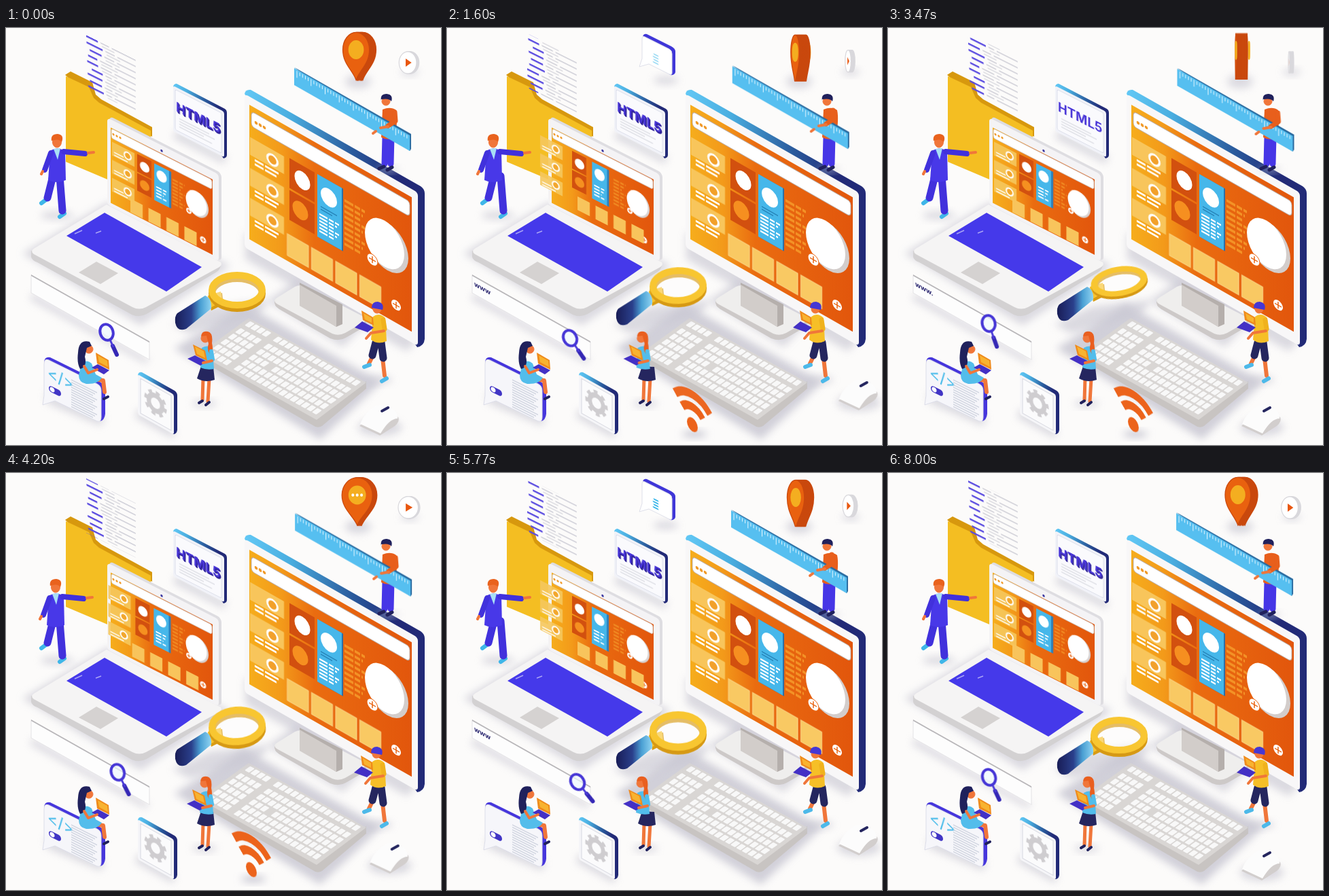
An HTML page that plays this animation: 640x614 px, repeating every 8030 ms.

```html
<!DOCTYPE html>
<html lang="en">
<head>
<meta charset="utf-8">
<title>Isometric web design</title>
<style>
html,body{margin:0;width:100%;height:100%;overflow:hidden;background:#fcfbfa}
svg{display:block;width:100vw;height:100vh}
text{font-family:Inter,Arial,sans-serif}
.limb{fill:none;stroke-linecap:round;stroke-linejoin:round}
.soft{fill:#c9c8d3;opacity:.65;filter:url(#blur)}
.white{fill:#fff}
.skin{fill:#f0763a;stroke:#f0763a}
.a4{animation:4015ms linear infinite}
.a8{animation:8030ms linear infinite}
.ruler{animation-name:ruler}
.mouse{animation-name:mouse}
.pull{animation-name:pull}
.nudge{animation-name:nudge}
.slip{animation-name:slip}
.drop{animation-name:drop}
.man{animation-name:man}
.woman{animation-name:woman}
.guy{animation-name:guy}
.bubble{animation-name:bubble}
.brace{animation-name:brace}
.para{animation-name:para}
.tag{animation-name:tag}
.rings{animation-name:rings}
.labels{animation-name:labels}
.reel{animation-name:reel}
.scroll{animation-name:scroll}
.bevel{animation-name:bevel}
.lens{animation-name:lens}
.lift{animation-name:lift}
.hoop{animation-name:hoop}
.dot{animation-name:dot}
.arc1{animation-name:arc1}
.arc2{animation-name:arc2}
.gear{animation:gear 8030ms linear infinite}
@keyframes ruler{0%,100%{transform:none}20%{transform:translate(5px,3px)}43.7%{transform:translate(-6px,-4px)}58%{transform:translate(-1.5px,-1px)}86.4%{transform:translate(1.5px,1px)}}
@keyframes mouse{0%,80%,100%{transform:none}17%{transform:translate(54px,-37px)}44%{transform:translate(56px,-37px)}58%{transform:translate(34px,-24px)}}
@keyframes pull{0%,78%,100%{transform:none}16%,45%{transform:translateX(-19px)}58%{transform:translateX(-18px)}}
@keyframes nudge{0%,78%,100%{transform:none}16%,58%{transform:translateX(-9px)}}
@keyframes slip{0%,78%,100%{transform:none}16%,58%{transform:translateX(-2px)}44%{transform:translateX(-5px)}}
@keyframes drop{0%,78%,100%{transform:none}16%,44%{transform:translate(9px,-8px)}58%{transform:translate(6px,-8px)}}
@keyframes man{0%,57%,100%{transform:none}16%,45%{transform:translateX(-7px)}}
@keyframes woman{0%,84%,100%{transform:none}19%,58%{transform:translateX(-4px)}44%{transform:translateX(-8px)}}
@keyframes guy{0%,84%,100%{transform:none}18%,60%{transform:translateX(-4px)}}
@keyframes bubble{0%,6%,84%,100%{opacity:0}11%,79%{opacity:1}}
@keyframes brace{0%,12%,38%,49%{opacity:0}15%,34%,53%,100%{opacity:1}}
@keyframes para{0%,38%{opacity:0}42%,100%{opacity:1}}
@keyframes tag{0%,8%,84%,100%{opacity:1}13%,79%{opacity:0}}
@keyframes rings{0%,46%,80%,100%{transform:none}54%,72%{transform:translateY(18px)}}
@keyframes labels{0%,46%,80%,100%{transform:none}54%,72%{transform:translateY(-27px)}}
@keyframes reel{0%,14%{transform:none}20%{transform:translateX(-4px)}38%,100%{transform:translateX(-35.5px)}}
@keyframes scroll{to{transform:translateY(-81px)}}
@keyframes bevel{0%,46%,100%{opacity:1}56%,88%{opacity:0}}
@keyframes lens{0%,100%{transform:translate(148px,448px)}10.3%{transform:translate(163px,453px) rotate(-8deg)}29%{transform:translate(198px,460px) rotate(-11deg)}43.2%{transform:translate(148px,435px) rotate(5deg)}59.4%{transform:translate(177px,445px) rotate(-8deg)}71.9%{transform:translate(192px,455px) rotate(-14deg)}}
@keyframes lift{0%,10.3%,100%{transform:none}29%,59.4%{transform:translateY(-13px)}71.9%{transform:translateY(-8px)}}
@keyframes hoop{0%,10.3%,100%{transform:translate(340px,386px)}29%{transform:translate(340px,386px) rotate(-4deg)}43.2%{transform:translate(340px,386px) rotate(-10deg) scaleY(.8)}59.4%{transform:translate(340px,385px) scaleY(1.25)}71.9%{transform:translate(340px,388px) scaleY(1.08)}}
@keyframes dot{0%,4%,66%,100%{opacity:0}6%,63%{opacity:1}}
@keyframes arc1{0%,7%,62.5%,100%{opacity:0}9%,60%{opacity:1}}
@keyframes arc2{0%,17%,58%,100%{opacity:0}20%,55%{opacity:1}}
@keyframes gear{to{transform:rotate(360deg)}}
</style>
</head>
<body>
<svg viewBox="0 0 640 614" preserveAspectRatio="none">
<defs>
<filter id="blur" x="-40%" y="-60%" width="180%" height="220%"><feGaussianBlur stdDeviation="6"/></filter>
<linearGradient id="edge"><stop stop-color="#62c8f5"/><stop offset=".25" stop-color="#4aaee0"/><stop offset=".6" stop-color="#2a5a9c"/><stop offset=".85" stop-color="#222a77"/></linearGradient>
<linearGradient id="fire"><stop stop-color="#f6ad1c"/><stop offset=".2" stop-color="#f39a1a"/><stop offset=".4" stop-color="#ea6c10"/><stop offset="1" stop-color="#e2560c"/></linearGradient>
<linearGradient id="grip" x1="1" x2="0"><stop stop-color="#8fd4f2"/><stop offset=".3" stop-color="#4a9fd3"/><stop offset=".55" stop-color="#2a3f8b"/><stop offset="1" stop-color="#191d57"/></linearGradient>
<clipPath id="codeBox"><path d="M112 5L198 48V128L112 85z"/></clipPath>
<clipPath id="reelBox"><path d="M61 160H204V210H61z"/></clipPath>
<path id="pinShape" vector-effect="non-scaling-stroke" d="M0 40C-7 26-24 17-24-3A24 25 0 0 1 24-3C24 17 7 26 0 40z"/>
<circle id="coinShape" r="15.5" vector-effect="non-scaling-stroke"/>
</defs>

<!-- code and folder -->
<path fill="#d7980e" d="M87 69L95 64 127 80 132 98 140 105 215 146V160L140 118z"/>
<path fill="#f4be22" d="M88 71L122 87 129 103 137 110 213 151V250L88 197z"/>
<g clip-path="url(#codeBox)"><g transform="matrix(1 .5 0 1 115 9)"><g id="code" class="a4 scroll"></g></g></g>

<!-- laptop -->
<path class="soft" d="M24 332L150 256 330 350 198 438z"/>
<path fill="#d3d1d2" d="M37 328V337Q38 342 46 345L185 422Q196 427 207 421L310 359Q317 354 316 345z"/>
<path fill="#f5f4f4" d="M44 323L148 260 316 345Q319 349 312 353L206 411Q196 416 186 411L41 333Q34 328 44 323z"/>
<path fill="#4539ea" d="M145 272L288 352 236 388 89 306z"/>
<path fill="none" stroke="#aaa4f5" stroke-width="1.500" d="M101 303L112 298M132 302l8-3"/>
<path fill="#d5d2d1" d="M133 344L165 361 139 377 107 360z"/>
<g transform="matrix(1 .51 0 1 149 132)">
<rect x="3" y="-4" width="165" height="130" rx="6" fill="#deddE1"/>
<rect width="164" height="128" rx="5" fill="#f4f3f5"/>
<circle cx="80" cy="8" r="1.700" fill="#3a36a0"/>
<rect x="5" y="12" width="150" height="111" fill="url(#fire)"/>
<rect x="6" y="13" width="148" height="14" rx="3" fill="#fff" stroke="#c8bdb8" stroke-width=".7"/>
<g id="lapDots" fill="#f09a2a"></g>
<g class="a4 pull" id="lapSide"></g>
<g class="a4 nudge">
<rect x="44" y="31" width="21" height="26" fill="#d2500f"/><circle cx="55" cy="45" r="7" class="white"/>
<rect x="44" y="59" width="21" height="26" fill="#d2500f"/><circle cx="55" cy="72" r="7" fill="#f59020"/>
</g>
<g class="a4 slip">
<rect x="72" y="32" width="22" height="54" fill="#2e7fb9"/><rect x="69" y="32" width="22" height="54" fill="#46b7ea"/>
<ellipse cx="80" cy="46" rx="7.500" ry="8" class="white"/><path id="lapBlue" stroke="#fff" stroke-width="2" stroke-dasharray="8 2 5 2"/>
</g>
<path id="lapBrick" stroke="#f08a22" stroke-width="2.500" stroke-dasharray="8 2 5 2"/>
<ellipse cx="133" cy="60" rx="16" ry="18" fill="#d8d2d1"/><ellipse cx="131" cy="59" rx="15.500" ry="17.500" class="white"/>
<circle cx="120" cy="76" r="4" class="white"/><path d="M117.500 76h5M120 73.500v5" stroke="#e9630f"/>
<circle cx="141" cy="108" r="4.500" class="white"/><path d="M138 108h6M141 105v6" stroke="#e9630f"/>
<g class="a4 drop" id="lapTiles" fill="#f8c45c"></g>
</g>

<!-- HTML5 card -->
<path class="soft" opacity=".5" d="M250 150L325 190 320 200 246 162z"/>
<path fill="url(#edge)" d="M246 86Q247 82 251 82L322 119Q325 121 325 125V187Q325 191 320 192z"/>
<g transform="matrix(1 .51 0 1 246 85)">
<rect width="75" height="67" rx="3" fill="#f1f2f8"/><rect x="3" y="4" width="68" height="59" rx="2" fill="#fafafd" stroke="#d6d9e6" stroke-width=".8"/>
<g font-size="18.500" font-weight="700"><g class="a4 bevel" fill="#2c2096"><text x="5" y="36">HTML5</text><text x="6" y="37">HTML5</text></g><text x="4" y="35" fill="#4936d7">HTML5</text></g>
<path stroke="#cdcfd8" stroke-width="1.200" d="M9 44h44M9 48h52M9 52h36M9 56h48"/>
</g>

<!-- speech card -->
<g class="a4 bubble">
<ellipse class="soft" cx="322" cy="77" rx="18" ry="6"/>
<path fill="#3f36d8" d="M288 13Q289 8 294 9L330 27Q336 30 336 35V65Q335 70 328 69z"/>
<path class="white" d="M291 13L327 31Q331 33 331 38V66Q331 70 327 68L297 53 283 57 287 45V16Q287 11 291 13z" stroke="#dedfe9"/>
<g transform="matrix(1 .51 0 1 294 40)" fill="#35b5e9" font-size="27" font-weight="600">
<text class="a4 brace" y="7">{</text><text class="a4 brace" x="17" y="7">}</text>
<path class="a4 para" stroke="#35b5e9" stroke-width="2" d="M10-7h7M9-3h8M10 1h7M9 5h8"/>
</g></g>

<!-- monitor -->
<path class="soft" opacity=".4" d="M352 300L606 458 590 476 352 340z"/>
<path class="soft" d="M385 402L430 368 535 430 495 470z"/>
<path fill="#cdc9c8" d="M395 402Q394 409 402 414L477 457Q490 462 500 456L524 442Q531 438 530 430z"/>
<path fill="#efeeed" d="M399 397L425 381Q433 377 441 381L524 424Q533 429 525 434L499 449Q489 454 480 450L400 407Q391 402 399 397z"/>
<path fill="#b5afac" d="M432 375L495 407V436L486 440 432 407z"/><path fill="#d2cdca" d="M432 378L486 409V440L432 409z"/>
<path fill="url(#edge)" d="M351 97Q352 90 360 91L610 233Q616 237 616 244V458Q615 468 605 470z"/>
<g transform="matrix(1 .57 0 1 351 97)">
<rect width="255" height="226" rx="5" fill="#f8f7f8"/>
<rect x="7" y="12" width="239" height="198" fill="url(#fire)"/>
<rect x="10" y="20" width="233" height="22" rx="5" fill="#fff" stroke="#b9a9a3"/>
<g id="monDots" fill="#f09a2a"></g>
<g id="monSide"></g>
<rect x="66" y="57" width="37" height="44" fill="#d2500f"/><ellipse cx="85" cy="79" rx="11.500" ry="13" class="white"/>
<rect x="66" y="104" width="37" height="44" fill="#d2500f"/><ellipse cx="82" cy="125" rx="11.500" ry="13" fill="#f68f20"/>
<rect x="109" y="57" width="36" height="92" fill="#2c6fa8"/><rect x="107" y="57" width="36" height="92" fill="#46b7ea"/>
<ellipse cx="124" cy="82" rx="12" ry="13" class="white"/>
<path stroke="#2680b5" stroke-width="1.500" d="M112 102h24M112 106h17"/>
<path id="monBlue" stroke="#fff" stroke-width="2.500" stroke-dasharray="12 2 7 2"/>
<path id="monBrick" stroke="#f39226" stroke-width="4" stroke-dasharray="13 2 8 2"/>
<ellipse cx="210" cy="105" rx="31" ry="35" fill="#d3cdcb"/><ellipse cx="206" cy="103" rx="29" ry="34" class="white"/>
<circle cx="188" cy="137" r="8" class="white" stroke="#e9630f"/><path d="M183 137h10M188 132v10" stroke="#e9630f" stroke-width="1.500"/>
<circle cx="223" cy="184" r="7" class="white"/><path d="M218 184h10M223 179v10" stroke="#e9630f" stroke-width="1.500"/>
<g clip-path="url(#reelBox)"><g class="a4 reel" id="monTiles" fill="#f9c963" stroke="#fbd98d"></g></g>
</g>

<!-- man with ruler -->
<ellipse class="soft" cx="562" cy="208" rx="16" ry="4"/>
<path class="limb" stroke="#4636e6" stroke-width="9" d="M558 160L557 200M567 160L566 200"/>
<path class="limb" stroke="#20215c" stroke-width="5" d="M549 207L556 204M561 209L568 205"/>
<path fill="#e85f1c" d="M554 120Q566 115 574 121Q577 135 572 162Q560 166 552 161z"/>
<circle class="skin" cx="559" cy="108" r="6"/><path fill="#20215c" d="M552 107Q550 97 560 97Q570 98 567 108Q564 103 552 105z"/>
<g class="a4 ruler">
<path fill="#2a6ba0" d="M424 58L428 60 596 156V178L594 181z"/>
<path fill="#56bff0" d="M424 59L594 158V181L424 84z"/>
<g transform="matrix(1 .582 0 1 424 59)"><path id="ticks" stroke="#e8f8ff" stroke-width="1"/></g>
<path class="limb" stroke="#e85f1c" stroke-width="7" d="M572 124L573 137 562 144"/>
<path class="limb skin" style="fill:none" stroke-width="4" d="M562 145L551 147M544 152L540 155"/>
</g>

<!-- pin and coin -->
<ellipse class="soft" cx="518" cy="79" rx="19" ry="10"/>
<g id="pin"></g>
<ellipse class="soft" cx="594" cy="65" rx="13" ry="5"/>
<g id="coin"></g>

<!-- man at the laptop -->
<ellipse class="soft" cx="75" cy="276" rx="24" ry="6"/>
<path class="limb" stroke="#3fb6e8" stroke-width="6" d="M52 258L60 252M79 278L86 273"/>
<path class="limb" stroke="#4131dc" stroke-width="11" d="M69 218L61 250M79 218L83 269"/>
<g class="a4 man">
<path fill="#4838e8" d="M65 181Q75 174 87 181L88 224Q74 230 62 224z"/>
<path fill="#a8e0f5" d="M70 178L80 177 76 194z"/>
<path class="limb" stroke="#4131dc" stroke-width="8" d="M66 184L57 209M85 182L116 185"/>
<path class="limb skin" style="fill:none" stroke-width="4" d="M54 211L52 215M121 184L129 183"/>
<ellipse class="skin" cx="75" cy="168" rx="6.500" ry="8"/><path fill="#e9621d" d="M67 167Q65 156 76 156Q86 157 82 168Q78 162 67 166z"/>
</g>

<!-- search bar -->
<path class="soft" opacity=".4" d="M38 390L211 488 205 494 36 400z"/>
<g transform="matrix(1 .565 0 1 37 364)">
<rect width="174" height="26" fill="#fdfdfd" stroke="#e4e3e6"/><path d="M0 0H174" stroke="#b8b6b9" stroke-width="2"/>
<text id="query" x="3" y="14" font-size="9.500" font-weight="700" fill="#29256f"></text>
</g>
<g class="a8 lens"><path class="limb" stroke="#3528b5" stroke-width="6" d="M9 20L15 33"/><path stroke="#4a3ad8" stroke-width="3" d="M5 11L10 22"/><ellipse rx="9.500" ry="12" transform="rotate(-18)" fill="#eef8fd" fill-opacity=".7" stroke="#4636d6" stroke-width="4"/></g>

<!-- keyboard -->
<path class="soft" style="opacity:.85" d="M248 472L350 406 552 522 462 606z"/>
<path fill="#c8c4c2" d="M284 480V488L455 587Q460 589 465 586L530 531V520L457 573z"/>
<path fill="#d9d6d4" d="M284 480L357 427 530 522 457 577z"/>
<g id="keys" transform="matrix(8.24 4.52 -10.4 7.57 357 427)" fill="#f8f8f8"></g>

<!-- big magnifier -->
<path class="soft" d="M245 436L300 410 390 400 370 424 270 450z"/>
<g class="a8 lift">
<path fill="#d99c13" d="M297 395L318 390 320 407 302 416z"/><path fill="#f7c32f" d="M297 394L316 388 318 402 301 412z"/>
<path fill="url(#grip)" d="M252 420L293 394Q303 398 302 413L265 443Q252 448 249 434Q248 424 252 420z"/>
<g class="a8 hoop"><ellipse cy="5" rx="37" ry="22" fill="none" stroke="#d69914" stroke-width="10"/><ellipse rx="37" ry="22" fill="#fff" fill-opacity=".35" stroke="#f8c631" stroke-width="10"/></g>
</g>

<!-- seated woman -->
<path class="soft" d="M58 535L145 572 140 586 60 552z"/>
<path fill="#4636dc" d="M56 492Q57 483 65 485L138 521Q146 525 146 533V568Q145 578 138 579z"/>
<path fill="#f6f6fa" stroke="#dcdde8" d="M63 489L134 524Q140 527 140 534V573Q140 581 134 579L72 549 54 555 56 541V495Q56 486 63 489z"/>
<g transform="matrix(1 .5 0 1 56 490)">
<text class="a4 tag" x="5" y="22" font-size="23" fill="#43b9e9">&lt;/&gt;</text>
<path id="cardText" stroke="#cfd3df" stroke-width="1.500"/>
<rect x="7" y="32" width="18" height="9" rx="4.500" fill="#4135c5"/><circle cx="12" cy="36.500" r="3.500" class="white"/>
</g>
<path class="limb skin" style="fill:none" stroke-width="6" d="M124 516L143 519 145 536"/>
<path class="limb" stroke="#20215c" stroke-width="4" d="M144 546L150 543"/>
<path fill="#53bdeb" d="M111 494Q119 487 126 494L132 510 141 515Q135 525 118 524Q107 522 107 511z"/>
<circle class="skin" cx="122" cy="473" r="6"/><path fill="#20215c" d="M123 462Q107 458 106 478Q104 493 109 502Q120 499 116 484L119 471 126 468z"/>
<path fill="#ef8a1b" d="M132 478L151 489 152 503 134 494z"/><path fill="#f8b330" d="M135 482L149 490 150 499 137 492z"/><path fill="#4330c5" d="M126 500L135 495 152 504 144 510z"/>
<path class="limb skin" style="fill:none" stroke-width="4" d="M115 498L121 508 134 503"/>

<!-- gear card -->
<path class="soft" d="M195 560L250 592 245 604 190 573z"/>
<path fill="url(#edge)" d="M194 511Q195 506 200 507L248 534Q252 537 252 541V592Q251 598 246 598z"/>
<g transform="matrix(1 .56 0 1 194 510)"><rect width="53" height="59" rx="3" fill="#f5f5f8"/><rect x="4" y="4" width="45" height="51" fill="#fbfbfc" stroke="#d6d7df"/>
<g transform="translate(26 28) scale(.9 1)"><g class="gear"><circle r="11" fill="none" stroke="#cfcdd0" stroke-width="7"/><circle r="16" fill="none" stroke="#cfcdd0" stroke-width="5" stroke-dasharray="6.280 6.286"/></g></g></g>

<!-- standing woman -->
<ellipse class="soft" cx="292" cy="553" rx="18" ry="5"/>
<path class="limb skin" style="fill:none" stroke-width="5" d="M290 516L289 548M299 516L297 550"/>
<path class="limb" stroke="#20215c" stroke-width="4" d="M284 552L289 549M294 555L299 551"/>
<path fill="#25265f" d="M287 498L305 499 307 518Q293 523 281 516z"/>
<g class="a4 woman">
<path fill="#52bdeb" d="M288 471Q297 465 304 473L306 502Q295 504 286 500z"/>
<circle class="skin" cx="293" cy="457" r="6"/><path fill="#e95f1f" d="M287 454Q288 445 297 447Q305 449 303 464Q306 477 300 480Q295 474 298 465L295 453z"/>
<path fill="#ef8a1b" d="M275 466L293 475 296 490 279 482z"/><path fill="#f8b330" d="M278 469L291 476 293 486 281 480z"/><path fill="#4330c5" d="M267 487L278 482 295 491 286 497z"/>
<path class="limb" stroke="#52bdeb" stroke-width="6" d="M302 476L304 488"/><path class="limb skin" style="fill:none" stroke-width="4" d="M303 490L290 493"/>
</g>

<!-- wifi -->
<ellipse class="soft a8 dot" cx="364" cy="598" rx="18" ry="5"/>
<g transform="matrix(.8 .5 0 1 361 584)" fill="none" stroke="#ec631b" stroke-width="12">
<circle class="a8 dot" r="10" fill="#ec631b" stroke="none"/>
<path class="a8 arc1" d="M-19-18A26 26 0 0 1 19-18"/><path class="a8 arc2" d="M-32-31A45 45 0 0 1 32-31"/>
</g>

<!-- man in yellow -->
<ellipse class="soft" cx="546" cy="518" rx="22" ry="6"/>
<path class="limb skin" style="fill:none" stroke-width="6" d="M540 482L534 494M554 486L557 512"/>
<path class="limb" stroke="#4db9e9" stroke-width="6" d="M527 499L535 496M553 520L560 516"/>
<path class="limb" stroke="#25265f" stroke-width="11" d="M544 463L539 482M552 463L555 486"/>
<g class="a4 guy">
<path fill="#f6bf27" d="M540 425Q549 418 558 427L560 461Q547 467 537 459z"/>
<circle class="skin" cx="546" cy="414" r="6"/><path fill="#4537d4" d="M538 412Q538 403 547 403Q557 405 554 415z"/>
<path fill="#ef8a1b" d="M523 416L540 426 541 438 525 430z"/><path fill="#f8b330" d="M526 420L538 427 538 434 528 429z"/><path fill="#4330c5" d="M513 441L524 432 541 441 532 448z"/>
<path class="limb" stroke="#f0b21d" stroke-width="7" d="M555 430L557 443"/><path class="limb skin" style="fill:none" stroke-width="4" d="M556 446L537 449 530 457"/>
</g>

<!-- mouse -->
<g class="a4 mouse">
<ellipse class="soft" cx="550" cy="588" rx="32" ry="13"/>
<path fill="#d2cecd" d="M520 586L548 560 577 573Q580 579 572 586L550 600z"/>
<path fill="#fcfcfc" d="M521 583Q528 565 545 556Q554 553 565 559Q577 565 576 575Q564 575 551 597z"/>
<path class="limb" stroke="#25265f" stroke-width="4" d="M553 564L562 559"/>
</g>
</svg>

<script>
const $ = id => document.getElementById(id);
const list = (n, f) => Array.from({length: n}, (_, i) => f(i)).join('');
const rect = (x, y, w, h, more = '') => `<rect x="${x}" y="${y}" width="${w}" height="${h}" ${more}/>`;
const lines = (id, n, x, y, w, step) =>
  $(id).setAttribute('d', list(n, i => `M${x} ${y + i * step}h${w - i % 3 * 3}`));

let seed = 11;
const rnd = () => (seed = seed * 16807 % 2147483647) / 2147483647;

// code listing, doubled so that it can wrap
const rows = list(9, i => {
  const x = 3 + rnd() * 10, a = 10 + rnd() * 16, b = 8 + rnd() * 14, y = i * 9;
  return rect(x, y, a, 2.6, 'fill="#594ae0"') + rect(x + a + 4, y, b, 1.7, 'fill="#cfcfd7"') +
    rect(x + a + b + 8, y, Math.max(4, 68 - x - a - b), 1.7, 'fill="#cfcfd7"') +
    rect(x + a + 6, y + 4.5, b + 6, 1.5, 'fill="#d8d8de"');
});
$('code').innerHTML = rows + `<g transform="translate(0 81)">${rows}</g>`;

// screens
$('lapDots').innerHTML = list(3, i => `<circle cx="${9 + i * 5}" cy="20" r="1.6"/>`);
$('monDots').innerHTML = list(3, i => `<circle cx="${17 + i * 6}" cy="33" r="2.3"/>`);
$('lapSide').innerHTML = list(3, i => {
  const y = 41 + i * 26.5;
  return rect(7, y - 9, 33, 20, 'fill="#f6c75d" opacity=".9"') +
    `<circle cx="30" cy="${y}" r="5" fill="#f2a72d" stroke="#fff" stroke-width="2"/>` +
    `<path d="M10 ${y + 5}h14M10 ${y + 9}h20" stroke="#fff" stroke-width="1.6"/>`;
});
const side = [74, 119.5, 163.5];
const sideTile = y => rect(8, y - 15, 50, 26, 'fill="#f8c55b"') +
  `<circle cx="41" cy="${y}" r="7.5" fill="#f2a02a" stroke="#fff" stroke-width="3"/>`;
$('monSide').innerHTML = `<g class="a4 rings">${side.map(sideTile).join('')}</g>` +
  `<g class="a4 labels" stroke="#fff" stroke-width="3" stroke-dasharray="13 2 20 2">${side.map(y => `<path d="M15 ${y + 15}h37M15 ${y + 21}h32"/>`).join('')}</g>`;
$('lapTiles').innerHTML = list(4, i => rect(34 + i * 26.5, 102, 18, 20));
$('monTiles').innerHTML = list(5, i => rect(63 + i * 35.5, 170, 31, 32));
lines('lapBlue', 4, 72, 65, 17, 4.5);
lines('lapBrick', 8, 96, 42, 18, 5);
lines('monBlue', 6, 110, 114, 29, 5);
lines('monBrick', 9, 147, 73, 30, 8);
lines('cardText', 12, 40, 8, 38, 3.6);
$('ticks').setAttribute('d', list(40, i => `M${4 + i * 4.15} 2v${i % 5 ? 5 : 10}`));

// keyboard with gaps under the top row and between blocks
$('keys').innerHTML = list(6, r => list(20, c =>
  c == 4 || c == 8 && r == 3 ? '' : rect(c + .6, r * 1.05 + (r ? .55 : .25), .8, .8, 'rx=".12"')));

// solids that turn about the vertical axis
const slab = (shape, n, fill) => list(n, () => `<use href="#${shape}" class="slab" fill="${fill}" stroke="${fill}" stroke-width="2.5"/>`);
const disc = '<circle cy="-3" r="12.500" fill="#f4ae20" stroke="#f4ae20" stroke-width="3" vector-effect="non-scaling-stroke"/>';
$('pin').innerHTML = `<g class="far">${disc}</g>${slab('pinShape', 9, '#c9480d')}` +
  `<g class="near"><use href="#pinShape" fill="#e9610f"/>${disc}<g class="dots" fill="#fff">${list(3, i => `<circle cx="${i * 7 - 7}" cy="-3" r="2.2"/>`)}</g></g>`;
$('coin').innerHTML = slab('coinShape', 5, '#d9d8dc') +
  '<g class="near"><use href="#coinShape" fill="#fff"/><path d="M-4-6L7 0-4 6z" fill="#e9570f"/></g>';

function mix(keys, t) {
  const i = Math.max(1, keys.findIndex(k => k[0] >= t));
  const [t0, a] = keys[i - 1], [t1, b] = keys[i];
  return a + (b - a) * (t - t0) / (t1 - t0);
}

function turn(id, x, y, angle, depth) {
  const g = $(id), s = Math.sin(angle) * depth, c = Math.max(.02, Math.cos(angle));
  const put = (el, k) => el.setAttribute('transform', `translate(${s * k} 0) scale(${c} 1)`);
  const slabs = g.querySelectorAll('.slab');
  g.setAttribute('transform', `translate(${x} ${y})`);
  slabs.forEach((el, i) => put(el, 2 * i / (slabs.length - 1) - 1));
  put(g.querySelector('.near'), 1);
  const far = g.querySelector('.far'), dots = g.querySelector('.dots');
  if (far) put(far, -1.4);
  if (dots) dots.style.opacity = c > .85 ? 1 : 0;
}

const LOOP = 4015;
const spin = [[0, -38], [790, 20], [1755, 120], [2330, 180], [3470, 270], [LOOP, 322]];
const bob = [[0, 0], [790, 2], [1755, 4], [2330, 6], [3470, 1], [LOOP, 0]];
const typed = [[.12, ''], [.27, '|'], [.31, 'w'], [.35, 'ww'], [.75, 'www'], [.95, 'www.'], [2, '']];

function draw(now) {
  const t = now % LOOP, deg = mix(spin, t), y = mix(bob, t);
  const a = ((deg + 90) % 180 - 90) * Math.PI / 180;
  turn('pin', 520, 35 + y, a, 8);
  turn('coin', 593, 51 - y * .6, a, 3);
  $('query').textContent = typed.find(k => t / LOOP < k[0])[1];
  requestAnimationFrame(draw);
}
draw(performance.now());
</script>
</body>
</html>
```
